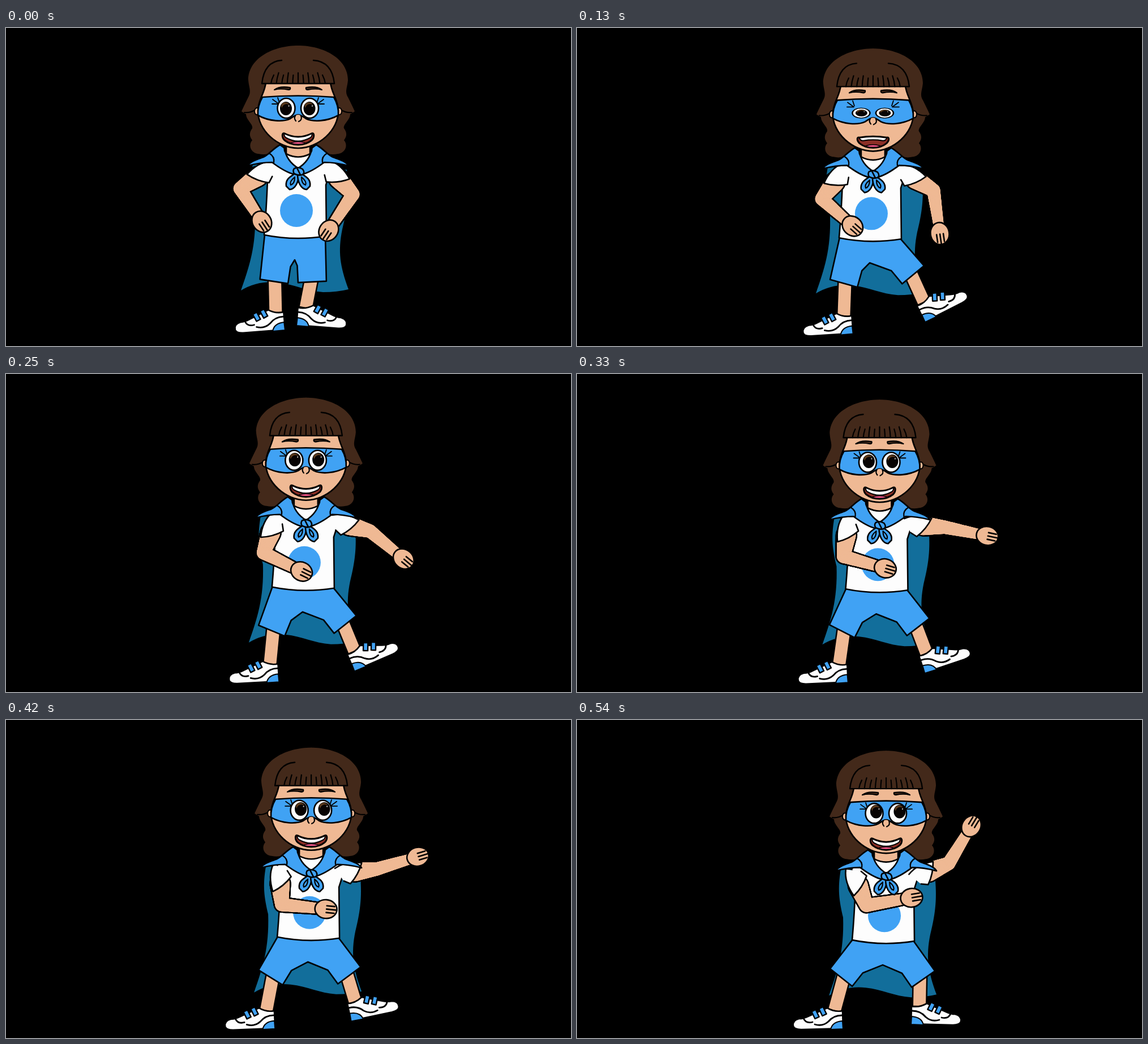
These frames come from a looping animation (998 by 561 pixels, 580 ms). An HTML page with a canvas:

```html
<!DOCTYPE html>
<html lang="en">
<head>
<meta charset="utf-8">
<title>Caped hero</title>
<style>
html, body { margin: 0; width: 100%; height: 100%; overflow: hidden; background: #000; }
canvas { display: block; }
</style>
</head>
<body>
<canvas id="stage" width="998" height="561"></canvas>
<script>
const ctx = document.getElementById('stage').getContext('2d');
const BLUE = '#40a2f4', SKIN = '#efb994', HAIR = '#43291a', CAPE = '#126e9b', WHITE = '#fdfdfd', INK = '#000';
const LOOP = 580, FPS = 24, LAST = 13;

const lerp = (a, b, t) => a + (b - a) * t;

function shape(d, fill, width = 2.6) {
  const path = new Path2D(d);
  if (fill) { ctx.fillStyle = fill; ctx.fill(path); }
  if (width) { ctx.strokeStyle = INK; ctx.lineWidth = width; ctx.stroke(path); }
}

function ellipse(x, y, rx, ry, fill, width = 0) {
  ctx.beginPath();
  ctx.ellipse(x, y, rx, ry, 0, 0, 7);
  ctx.fillStyle = fill;
  ctx.fill();
  if (width) { ctx.lineWidth = width; ctx.strokeStyle = INK; ctx.stroke(); }
}

function at(x, y, angle, flip, draw) {
  ctx.save();
  ctx.translate(x, y);
  ctx.scale(flip, 1);
  ctx.rotate(angle);
  draw();
  ctx.restore();
}

function bothSides(draw) {
  draw();
  at(1032, 0, 0, -1, draw);
}

function drawCape() {
  shape('M436 240C430 275 433 295 440 325C442 385 430 420 415 463Q445 445 480 449C510 452 530 464 560 466'
    + 'Q585 466 605 461C590 420 586 395 594 355C604 315 606 290 602 250Z', CAPE, 0);
}

function drawShoe() {
  shape('M0 -2L-1 -33Q-14 -30 -28 -38L-62 -23Q-70 -19 -78 -19Q-90 -16 -88 -6Q-86 0 -74 0Z', WHITE);
  shape('M-22 0Q-19 -14 -1 -15L0 -1Z', BLUE, 2);
  shape('M-50 -9Q-36 -5 -26 -14Q-17 -25 -2 -25M-70 -20Q-66 -10 -54 -13', null, 2.8);
  for (const [x, y] of [[-49, -27], [-36, -32]])
    at(x, y, -.45, 1, () => shape('M-4 -7H4V7H-4Z', BLUE, 2.4));
}

// Maps a point given along a leg, hanging straight down from the hip, to the stage.
function turn({ x, y, angle }, px, py) {
  const c = Math.cos(angle), s = Math.sin(angle);
  return [x + px * c - py * s, y + px * s + py * c];
}

function drawLeg(hip, heel, flip) {
  const knee = turn(hip, 0, 68);
  const ankle = turn({ ...heel, angle: heel.angle * flip }, -15 * flip, -34);
  ctx.lineCap = 'butt';
  for (const [color, width] of [[INK, 27], [SKIN, 22]]) {
    ctx.strokeStyle = color;
    ctx.lineWidth = width;
    ctx.beginPath();
    ctx.moveTo(...knee);
    ctx.lineTo(...ankle);
    ctx.stroke();
  }
  ctx.lineCap = 'round';
  at(heel.x, heel.y, heel.angle, flip, drawShoe);
}

function drawShorts(left, right, dx, dy) {
  const points = [
    [457 + dx, 364 + dy], turn(left, -25, 78), turn(left, 25, 78), turn(left, 25, 48),
    [510 + dx, 409 + dy], turn(right, -25, 48), turn(right, -25, 78), turn(right, 25, 78), [564 + dx, 366 + dy]
  ];
  shape('M' + points.map(p => p.join(' ')).join('L') + 'Z', BLUE);
}

function drawTorso() {
  shape('M455 240L475 215H557L577 240L565 277L566 367Q510 376 456 365Q460 320 462 268Z', WHITE);
  ellipse(513, 322, 29, 29, BLUE);
}

function taper(from, to, r0, r1, color) {
  for (let y = from; y <= to; y++) {
    const r = lerp(r0, r1, (y - from) / (to - from));
    ellipse(0, y, r, r, color);
  }
}

// An arm hangs down from the shoulder; the forearm turns at the elbow.
function drawArm(x, flip, swing, bend, reach) {
  at(x, 252, swing, flip, () => {
    const upper = 56;
    for (const [color, grow] of [[INK, 1.3], [SKIN, -1.3]]) {
      taper(18, upper, 18 + grow, 13 + grow, color);
      at(0, upper, bend, 1, () => taper(0, reach - 16, 13 + grow, 10.5 + grow, color));
    }
    shape('M-10 -16Q-21 4 -14 32L20 8L14 -3Z', WHITE, 0);
    shape('M-10 -16Q-21 4 -14 32Q6 24 20 8L14 -3', WHITE);
    at(0, upper, bend, 1, () => {
      ellipse(0, reach, 16.5, 19.5, SKIN, 2.6);
      for (const side of [-1, 0, 1])
        shape(`M${side * 6} ${reach + 1}V${reach + 18 - 3 * Math.abs(side)}`, null);
    });
  });
}

function drawHairBack() {
  bothSides(() => {
    shape('M517 31C469 31 428 55 428 92C429 105 434 112 428 122Q420 138 416 147Q420 150 424 152'
      + 'C424 162 437 170 435 177C430 184 429 190 435 198C427 207 433 221 446 222C460 225 470 222 485 207H517Z', HAIR, 0);
    shape('M421 149Q432 150 441 144', null, 2.2);
  });
}

function drawScarf() {
  shape('M495 203V222Q516 233 537 222V203Z', SKIN);
  bothSides(() => {
    shape('M484 206C470 214 464 224 454 228C443 232 432 235 427 243Q450 237 470 237C482 246 495 255 509 258'
      + 'L517 248C504 240 494 228 492 212Z', BLUE);
    shape('M465 221Q475 227 473 237M492 211Q490 216 496 223', null, 2.4);
    shape('M513 255C502 262 493 267 495 279L501 285C511 284 517 272 517 258Z', BLUE);
    shape('M510 263Q500 271 503 277Q510 275 510 263', null, 2.2);
  });
  shape('M509 248Q517 244 524 249Q529 256 523 259Q516 261 509 257Q506 252 509 248M514 247L520 259', BLUE);
}

function drawEye(x, open, gx, gy) {
  if (open < .15) {
    shape(`M${x - 14} 144A14 10 0 0 0 ${x + 14} 144Z`, SKIN, 0);
    shape(`M${x - 14} 144A14 10 0 0 0 ${x + 14} 144`, null, 1.8);
    return;
  }
  ctx.save();
  ctx.translate(0, 148 * (1 - open));
  ctx.scale(1, open);
  ellipse(x, 141.5, 15.5, 17.5, WHITE, 2.6);
  ellipse(x + gx, 141.5 + gy, 10.5, 12, INK);
  ellipse(x + gx - 1, 137 + gy, 7.5, 6.5, '#5b3a1c');
  ellipse(x + gx + 1, 143 + gy, 8.5, 9.5, '#080403');
  ellipse(x + gx + 5, 137 + gy, 1, 1, WHITE);
  ctx.restore();
}

function drawMouth(open) {
  const corner = lerp(186, 190, open), top = lerp(192, 180, open), bend = 2 * top - corner;
  const mouth = `M492 ${corner}Q516 ${bend} 540 ${corner}C545 ${corner - 2} 545 193 540 198`
    + `Q530 206 516 206Q502 206 492 198C487 193 487 ${corner - 2} 492 ${corner}Z`;
  ctx.save();
  ctx.clip(new Path2D(mouth));
  shape(mouth, '#8c2f26', 0);
  ellipse(516, 206, 16, 5.5, '#ee5284', 1.5);
  const teeth = new Path2D(`M498 ${lerp(188, 186, open)}Q516 ${bend} 534 ${lerp(188, 186, open)}`);
  for (const [color, width] of [[INK, 15], [WHITE, 11]]) {
    ctx.strokeStyle = color;
    ctx.lineWidth = width;
    ctx.stroke(teeth);
  }
  ctx.restore();
  shape(mouth, null, 3);
}

function drawFringe() {
  shape('M452 98Q455 60 490 56H542Q577 60 580 98Z', HAIR, 0);
  shape('M487 57Q456 59 452 98H580Q576 59 543 57', null, 2.4);
  for (let i = -5; i <= 5; i++) {
    const x = 516 + i * 9.6, rise = i % 2 ? 15 : 19;
    shape(`M${x} 98Q${x - i * .2} ${98 - rise / 2} ${x - i} ${98 - rise}`, null, 2.2);
  }
}

function drawHead(blink, gx, gy) {
  bothSides(() => ellipse(443, 147, 4, 6, SKIN, 2));
  shape('M459 96C457 115 446 125 445 145C444 180 480 212 516 212C552 212 588 180 587 145C586 125 575 115 573 96Z', SKIN);
  shape('M453 122Q516 117 579 122Q588 137 587 154C567 165 543 166 530 160Q520 153 516 153Q512 153 502 160'
    + 'C489 166 465 165 445 154Q444 137 453 122Z', BLUE);
  shape('M512 164Q508 159 511 155Q516 151 521 155Q524 160 517 165', SKIN, 0);
  shape('M512 164Q508 159 511 155M517 165Q524 162 521 155', null, 2.2);
  bothSides(() => {
    shape('M482 134L471 126M481 134L470 134M483 132L480 123', null, 1.8);
    shape('M474 109Q483 102 502 105Q503 109 499 109Q485 106 474 109Z', HAIR, 2.2);
  });
  drawEye(495, 1 - blink, gx, gy);
  drawEye(536.5, 1 - blink, gx, gy);
  drawMouth(blink);
  drawFringe();
}

function render(k) {
  const dx = 2.31 * k, dy = 1.78 * k;
  const step = Math.min(1, k / 2);                 // the right foot kicks out first
  const settle = Math.max(0, k - 2) / (LAST - 2);  // then it comes down
  const blink = Math.max(0, 1 - Math.abs(k - 2) / 2);
  const onBody = draw => at(dx, dy, 0, 1, draw);

  const leftHip = { x: 485 + dx, y: 370 + dy, angle: .15 + .04 * k };
  const rightHip = { x: 537 + dx, y: 370 + dy, angle: -.05 - .65 * step + .09 * settle };
  const leftHeel = { x: 493 - 1.77 * k, y: 546 - 12 * (1 - k / LAST) ** 3, angle: -.05 * (1 - k / LAST) };
  const rightHeel = {
    x: lerp(513, 615, step) + 4 * settle - 29 * settle ** 4,
    y: lerp(526, 518, step) + 20 * settle,
    angle: lerp(-.05, .5, step) * (1 - settle ** 2)
  };

  ctx.fillStyle = INK;
  ctx.fillRect(0, 0, 998, 561);
  ctx.lineJoin = ctx.lineCap = 'round';

  onBody(drawCape);
  drawLeg(leftHip, leftHeel, 1);
  drawLeg(rightHip, rightHeel, -1);
  drawShorts(leftHip, rightHip, dx, dy);
  onBody(() => {
    drawTorso();
    drawHairBack();
    drawArm(575, -1, .74 + .095 * k, -1.33 + .15 * k, 77);
    drawArm(460, 1, .98 - .105 * k, -1.56 + .016 * k, 70 + .85 * k);
    drawScarf();
    drawHead(blink, .3 * k - .5, .5 - .28 * k);
  });
}

function frame() {
  // Drawn at 24 steps a second, held on a clock of 10 ms ticks.
  const ticks = Math.floor(performance.now() % LOOP / 10);
  render(Math.ceil((ticks + .5) * FPS / 100) - 1);
  requestAnimationFrame(frame);
}
frame();
</script>
</body>
</html>
```
